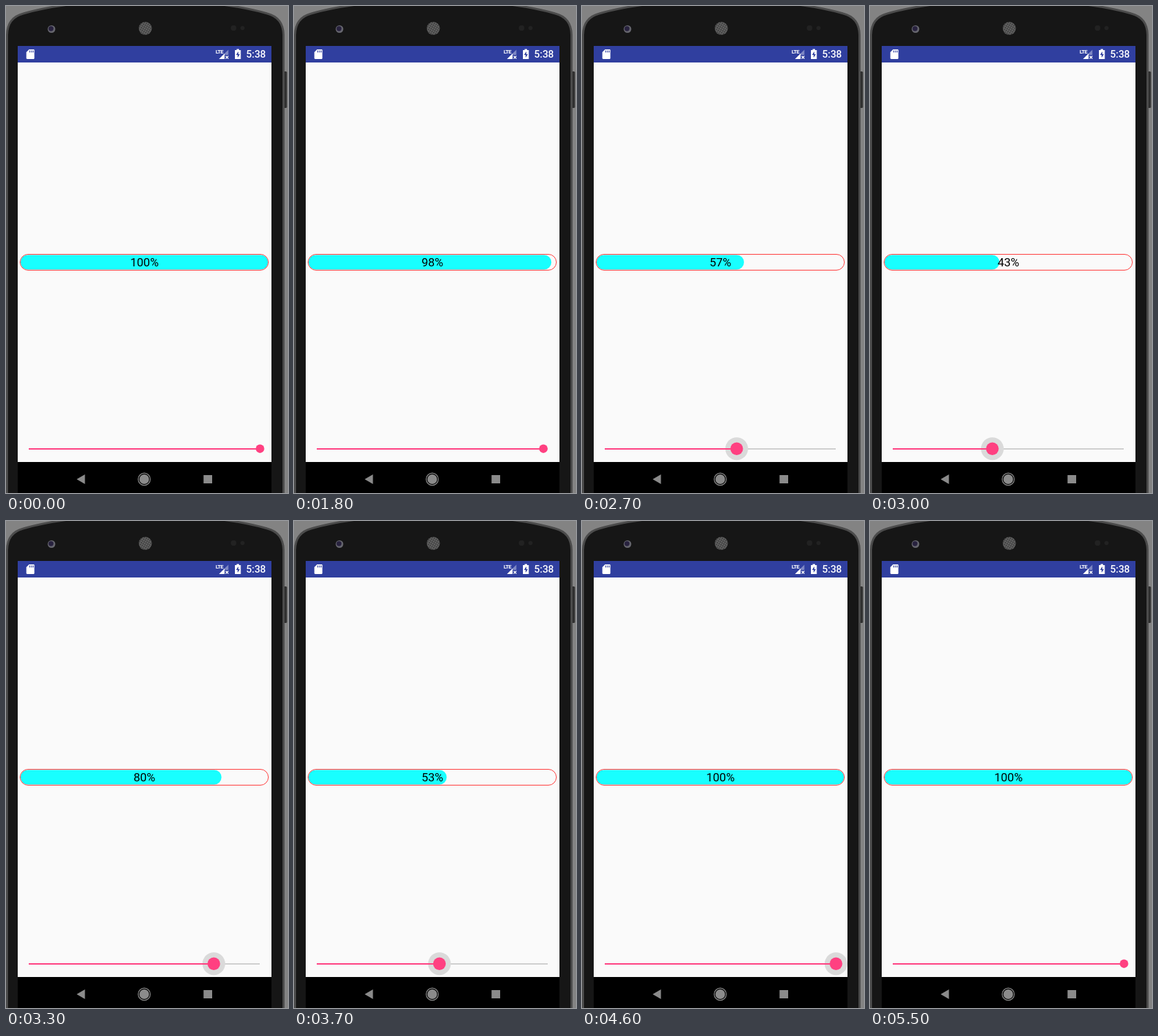
These frames come from a looping animation (409x707 px, 6200 ms). An HTML page:

```html
<!DOCTYPE html>
<html lang="en">
<head>
<meta charset="utf-8">
<title>Progress bar and slider</title>
<style>
html, body { margin: 0; width: 100%; height: 100%; overflow: hidden; background: #838383; }
svg { display: block; }
text { font-family: Roboto, sans-serif; }
</style>
</head>
<body>
<svg width="409" height="707" viewBox="0 0 409 707">
  <defs>
    <pattern id="mesh" width="3" height="3" patternUnits="userSpaceOnUse" patternTransform="rotate(30 202 33)">
      <rect width="3" height="3" fill="#686868"/>
      <circle cx="1.5" cy="1.5" r="1" fill="#2a2a2a"/>
    </pattern>
  </defs>

  <!-- phone body -->
  <rect x="402" y="95" width="5.5" height="53" rx="1.5" fill="#303030"/>
  <path d="M1.5 710V42Q2 17 25 11Q90 -8 202 -8T379 11Q402 17 402.500 42V710Z"
        fill="#161616" stroke="#4b4b4b" stroke-width="3"/>
  <circle cx="66" cy="33.500" r="5.500" fill="#66666e"/>
  <circle cx="65.300" cy="32.800" r="3.600" fill="#28223f"/>
  <circle cx="202" cy="32.500" r="9.500" fill="url(#mesh)"/>
  <g fill="#222"><circle cx="330" cy="32" r="4"/><circle cx="343" cy="32" r="3"/></g>

  <!-- screen -->
  <path d="M17 58h368v24h-368z" fill="#303f9f"/>
  <path d="M17 82h368v580h-368z" fill="#fafafa"/>
  <path d="M17 662h368v45h-368z"/>

  <!-- status icons -->
  <path d="M33.500 63H40q1.200 0 1.200 1.200V75.500q0 1.500-1.500 1.500H31q-1.500 0-1.500-1.500V67Z" fill="#fff"/>
  <path d="M34.500 64.500v3M37 64.500v3M39.400 64.500v3" stroke="#303f9f" stroke-width="1.100"/>
  <g fill="#fff">
    <text x="304" y="69" font-size="8" font-weight="700" font-stretch="75%" letter-spacing="-.8">LTE</text>
    <path d="M309 77L322.500 63.500V77Z" fill="#7f88c4"/>
    <path d="M309 77L317 69V77Z"/>
    <path d="M317 71h6v6h-6z" fill="#303f9f"/>
    <path d="M318.500 72.500l4 4m0-4l-4 4" stroke="#fff" stroke-width="1.300"/>
    <path d="M334.500 62.500h3.500V64H340.500V77H332V64h2.500z"/>
    <path d="M337 66l-3.300 5h2.200v4l3.200-5h-2.100z" fill="#303f9f"/>
    <text x="348.300" y="75" font-size="14.500" font-weight="500">5:38</text>
  </g>

  <!-- progress bar -->
  <rect id="fill" x="21" y="361.500" height="21" rx="10.500" fill="#18ffff"/>
  <rect x="20.500" y="360.500" width="360" height="23" rx="11.500" fill="none" stroke="#ff3b3b"/>
  <text id="label" x="200.800" y="378" font-size="17" text-anchor="middle"></text>

  <!-- slider -->
  <path d="M33 643H368" stroke="#cfcfcf" stroke-width="2"/>
  <circle id="halo" cy="642.700" r="16.500" fill="#dadada"/>
  <path id="track" stroke="#ff4081" stroke-width="2"/>
  <circle id="thumb" cy="642.700" fill="#ff4081"/>

  <!-- navigation -->
  <g fill="#8b8b8b">
    <path d="M102.500 687L114.500 680V694Z"/>
    <circle cx="200.500" cy="687" r="7"/>
    <circle cx="200.500" cy="687" r="8.800" fill="none" stroke="#8b8b8b" stroke-width="1.200"/>
    <path d="M286.500 681h12.500v12h-12.500z"/>
  </g>
</svg>
<script>
const LOOP = 6200, STEP = 100, DRAG_START = 18;
// Slider percentages, one per step of the drag
const drag = [98, 97, 96, 85, 75, 64, 45, 41, 41, 57, 67, 61, 43, 34, 81,
              80, 62, 40, 25, 53, 72, 76, 64, 52, 39, 19, 44, 76, 100];

const el = id => document.getElementById(id);
const set = (id, attrs) => {
  for (const name in attrs) el(id).setAttribute(name, attrs[name]);
};

function thumbRadius(step) {
  if (step < 19 || step >= 55) return 6.2;
  if (step < 20) return 7.5;
  if (step < 51) return 9.2;
  return step < 52 ? 8 : 7;
}

function haloOpacity(step) {
  if (step < 19 || step > 46) return 0;
  return step < 20 ? 0.5 : 1;
}

function draw(time) {
  const step = Math.floor(time % LOOP / STEP);
  const percent = drag[step - DRAG_START] ?? 100;
  const x = 33.4 + 3.35 * percent;
  set('fill', { width: 21.7 + 3.373 * percent });
  el('label').textContent = percent + '%';
  set('track', { d: `M33 643H${x}` });
  set('halo', { cx: x, opacity: haloOpacity(step) });
  set('thumb', { cx: x, r: thumbRadius(step) });
}

const start = performance.now();
function tick() {
  draw(performance.now() - start);
  requestAnimationFrame(tick);
}
tick();
</script>
</body>
</html>
```
